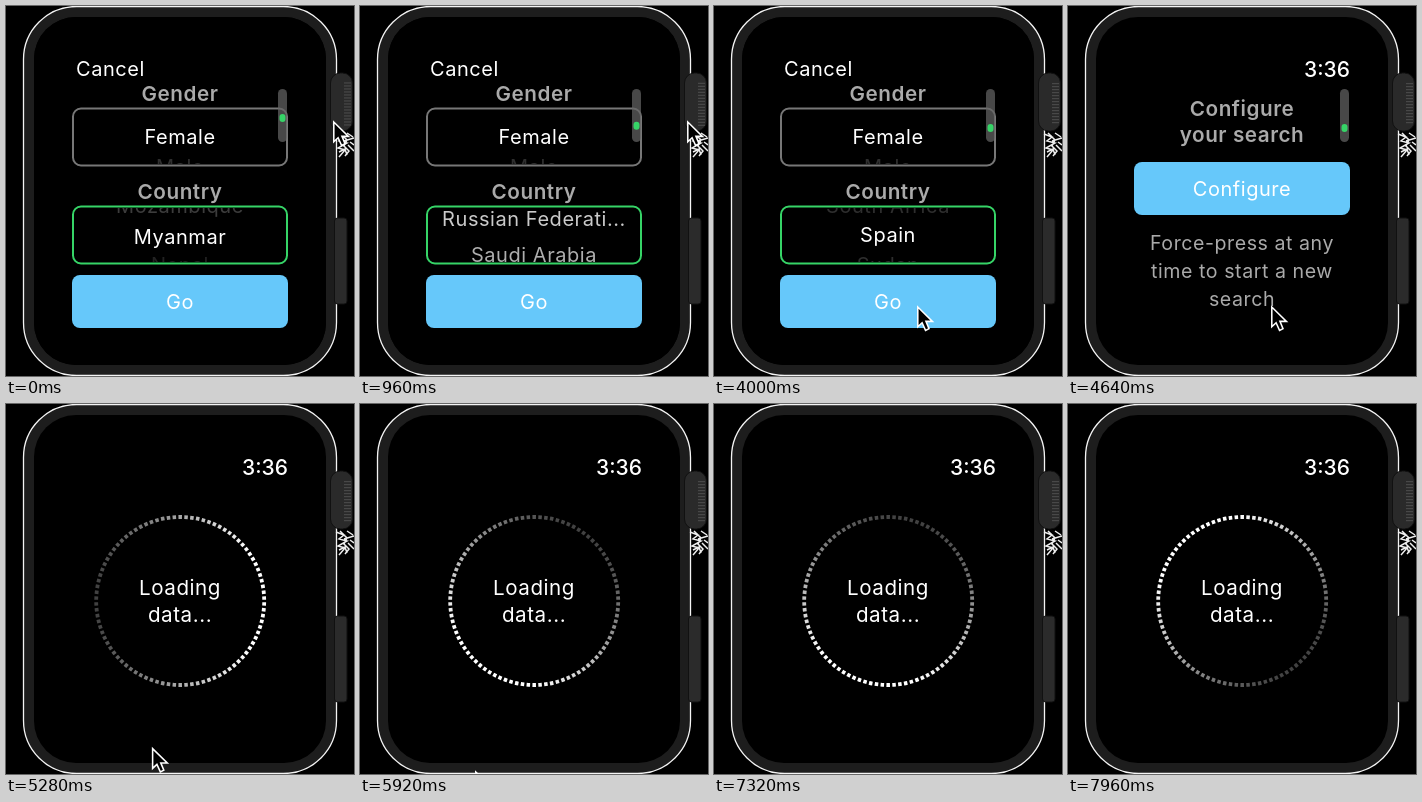
Animation of 348x370 px, one loop 8 s. Source, as an HTML page with a canvas:

```html
<!DOCTYPE html>
<html lang="en">
<head>
<meta charset="utf-8">
<title>Watch search</title>
<style>
  html, body { margin: 0; width: 100%; height: 100%; overflow: hidden; background: #000; }
  canvas { display: block; width: 348px; height: 370px; }
</style>
</head>
<body>
<canvas></canvas>
<script>
const W = 348, H = 370, LOOP = 8000, CENTER = 174;
const BLUE = '#66c8fa', GREEN = '#36d467', GRAY = '#aaa';
const canvas = document.querySelector('canvas');
const ctx = canvas.getContext('2d');
const scale = window.devicePixelRatio || 1;
canvas.width = W * scale;
canvas.height = H * scale;

const countries = ['Mozambique', 'Myanmar', 'Nepal', 'Netherlands', 'New Zealand', 'Nicaragua',
  'Niger', 'Nigeria', 'Norway', 'Oman', 'Pakistan', 'Panama', 'Paraguay', 'Peru', 'Philippines',
  'Poland', 'Portugal', 'Qatar', 'Romania', 'Russian Federati...', 'Saudi Arabia', 'Senegal',
  'Singapore', 'Somalia', 'South Africa', 'Spain', 'Sudan'];

// Keys are [time, value]; each span is eased.
const wheelKeys = [[0, 0.95], [760, 19.26], [880, 19.26], [1640, 25.04], [1900, 25.04], [1920, 25]];
const cursorX = [[2500, 327], [2800, 250], [3320, 203], [4800, 203], [5600, 115]];
const cursorY = [[2500, 115], [2800, 135], [3320, 300], [4800, 300], [5600, 367]];
const pressKeys = [[3340, 0], [3500, 1], [3720, 1], [4000, 0]];
const dismissKeys = [[4140, 0], [4480, 1]];
const loadingKeys = [[4680, 0], [5000, 1]];

const clamp = v => Math.min(1, Math.max(0, v));
const smooth = v => v * v * (3 - 2 * v);

function sample(keys, t) {
  const next = keys.findIndex(key => key[0] > t);
  if (next < 0) return keys[keys.length - 1][1];
  if (next === 0) return keys[0][1];
  const [t0, a] = keys[next - 1], [t1, b] = keys[next];
  return a + (b - a) * smooth((t - t0) / (t1 - t0));
}

function box(x, y, w, h, r, fill, stroke, line = 2) {
  ctx.beginPath();
  ctx.roundRect(x, y, w, h, r);
  if (fill) { ctx.fillStyle = fill; ctx.fill(); }
  if (stroke) { ctx.strokeStyle = stroke; ctx.lineWidth = line; ctx.stroke(); }
}

// y is the middle of the capital letters.
function text(string, x, y, { size = 20, weight = 400, color = '#fff', align = 'center', spacing = 0.55 } = {}) {
  ctx.font = `${weight} ${size}px Inter, sans-serif`;
  ctx.letterSpacing = `${spacing}px`;
  ctx.textAlign = align;
  ctx.fillStyle = color;
  ctx.fillText(string, x, y + size * 0.364);
}

const heading = (string, y) => text(string, CENTER, y, { size: 20.7, weight: 600, color: GRAY });

function layer(alpha, draw) {
  ctx.save();
  ctx.globalAlpha *= alpha;
  draw();
  ctx.restore();
}

function picker(items, position, y, color) {
  ctx.save();
  ctx.beginPath();
  ctx.rect(68, y - 27, 212, 54);
  ctx.clip();
  items.forEach((item, i) => {
    const angle = (i - position) * 1.27;
    if (Math.abs(angle) > 1.5) return;
    layer(Math.cos(angle) ** 1.4, () => text(item, CENTER, y + 31 * Math.sin(angle)));
  });
  ctx.restore();
  box(67, y - 28.5, 214, 57, 8, null, color);
}

function scrollBar(position) {
  box(272, 83, 9, 53, 4.5, 'rgba(100,100,100,.72)');
  box(273.5, 107.6 + position * 0.42, 6, 8, 3, GREEN);
}

function button(label, y, press = 0) {
  ctx.save();
  ctx.translate(CENTER, y);
  ctx.scale(1 - 0.04 * press, 1 - 0.04 * press);
  ctx.globalAlpha *= 1 - 0.4 * press;
  box(-108, -26.5, 216, 53, 8, BLUE);
  text(label, 0, 0.5);
  ctx.restore();
}

const clock = () => text('3:36', 282, 63.5, { size: 21, weight: 500, align: 'right', spacing: 0 });

function formPage(position, press) {
  text('Cancel', 70, 63, { align: 'left' });
  heading('Gender', 87.5);
  picker(['Female', 'Male'], 0, 131, '#777');
  heading('Country', 185.5);
  picker(countries, position, 229, GREEN);
  button('Go', 295.5, press);
  scrollBar(position);
}

function configurePage(position) {
  clock();
  heading('Configure', 102);
  heading('your search', 128);
  button('Configure', 182.5);
  ['Force-press at any', 'time to start a new', 'search'].forEach((line, i) =>
    text(line, CENTER, 237 + 28 * i, { size: 19.6, color: GRAY }));
  scrollBar(position);
}

function loadingPage(t) {
  clock();
  text('Loading', CENTER, 184, { size: 20.6 });
  text('data...', CENTER, 210.5, { size: 20.6 });
  const count = 90, step = 2 * Math.PI / count;
  const dim = (35 + (t - 5920) * 0.757) * Math.PI / 180;
  ctx.lineWidth = 3.8;
  for (let i = 0; i < count; i++) {
    const angle = i * step;
    const level = 65 + 190 * clamp(0.55 * (1 - Math.cos(angle - dim)));
    ctx.strokeStyle = `rgb(${level},${level},${level})`;
    ctx.beginPath();
    ctx.arc(174.2, 197, 84, angle - Math.PI / 2 - step * 0.3, angle - Math.PI / 2 + step * 0.3);
    ctx.stroke();
  }
}

function watch(position) {
  box(17.5, 0.5, 313, 369, 53, '#1d1d1d', '#f4f4f4', 1.3);
  box(28, 11, 292, 348, 42, '#000');
  box(328.5, 212, 12.5, 86, 3, '#2b2b2b', '#111', 1);
  box(324.5, 67, 22, 58, 10, '#2a2a2a', '#111', 1);
  ctx.fillStyle = '#484848';
  const shift = (position * 13) % 3;
  for (let y = 76 + shift; y < 119; y += 3) ctx.fillRect(338, y, 7, 1.2);
}

function scribble() {
  ctx.strokeStyle = '#eee';
  ctx.lineWidth = 1.5;
  ctx.stroke(new Path2D('M330 128l8 3-5 4 8 2-9 5 7 2-6 7M334 127l7 7-3 6 5 5-4 5' +
    'M341 127l6 4M338 135l10-3M342 139l6 6M333 146l6-3 2 6M344 136l4 3'));
}

function pointer(x, y) {
  ctx.save();
  ctx.translate(x + 0.8, y + 1);
  ctx.scale(0.86, 0.9);
  const arrow = new Path2D('M0 0V22L5 17.5L9 26L13 24L9.5 16H17Z');
  ctx.fillStyle = '#000';
  ctx.fill(arrow);
  ctx.strokeStyle = '#fff';
  ctx.lineWidth = 1.8;
  ctx.stroke(arrow);
  ctx.restore();
}

function render(t) {
  const position = sample(wheelKeys, t);
  const dismiss = sample(dismissKeys, t);
  const loading = sample(loadingKeys, t);
  ctx.setTransform(scale, 0, 0, scale, 0, 0);
  ctx.fillStyle = '#000';
  ctx.fillRect(0, 0, W, H);
  watch(position);

  ctx.save();
  ctx.beginPath();
  ctx.roundRect(28, 11, 292, 348, 42);
  ctx.clip();
  if (dismiss > 0 && loading < 1) layer(1 - loading, () => configurePage(position));
  if (dismiss < 1) {
    ctx.translate(0, 350 * dismiss);
    box(28, 11, 292, 348, 0, '#000');
    formPage(position, sample(pressKeys, t));
  }
  if (loading > 0) layer(loading, () => loadingPage(t));
  ctx.restore();

  scribble();
  if (t < 6280) pointer(sample(cursorX, t), sample(cursorY, t));
}

function tick() {
  render(performance.now() % LOOP);
  requestAnimationFrame(tick);
}
tick();
</script>
</body>
</html>
```
